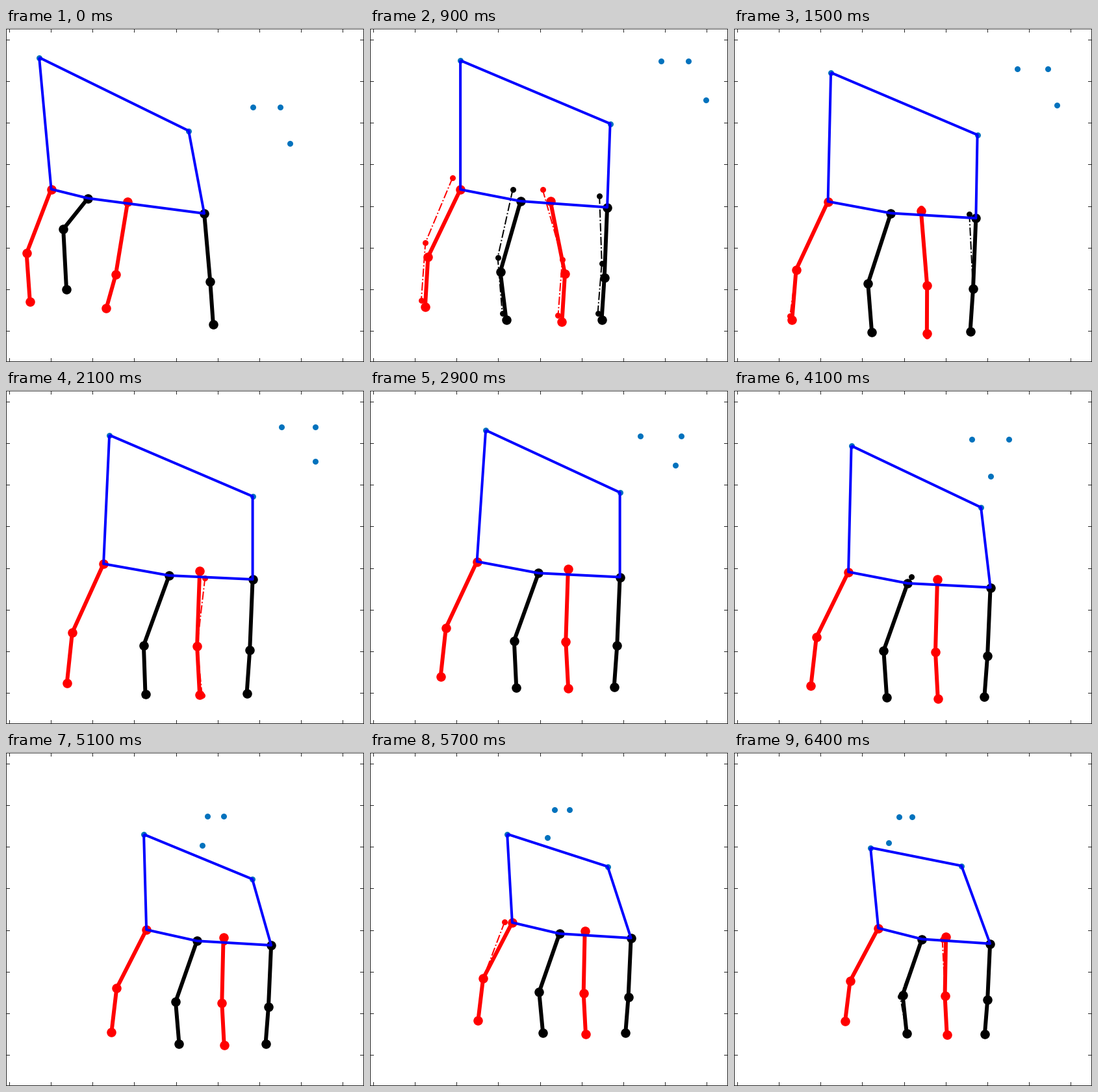
These frames come from a looping animation (551 px wide and 515 px high, 6.5 s). A matplotlib script:

```python
import numpy as np
import matplotlib.pyplot as plt
from matplotlib.animation import FuncAnimation

W, H, DPI = 551, 515, 100
FRAMES, INTERVAL = 65, 100
PX = 72 / DPI
RED, BLACK, BLUE, DOT, EDGE = "#ff0000", "#000000", "#0000ff", "#0072bd", "#262626"
NUDGE = np.array([-0.9, -0.5])

# Trunk: hind hip, distance to the fore hip, and the two back points above the hips
KEYS = [0, 9, 21, 29, 41, 51, 64]
HIP_X = [70.5, 140, 151, 165.5, 177, 217, 223]
HIP_Y = [249, 249.5, 268.5, 265, 281, 274.5, 272]
SPAN = [235.5, 226, 229.5, 220, 218.5, 192, 172]
RUMP_X = [-18.5, 0, 9, 13.5, 4.5, -4, -12]
RUMP_Y = [-203, -199, -198.5, -202.5, -194.5, -147, -124]
NECK_X = [-24, 4.5, 0, 0, -14.5, -29, -44]
NECK_Y = [-127.5, -129, -128, -130.5, -123.5, -102, -120]

# Head: one eye, then the gap to the other eye and to the mouth
EYE_X = [381, 449, 424.5, 417, 367, 311, 255]
EYE_Y = [122, 51, 57, 71.5, 76.5, 99, 100]
EYE_GAP = [42, 41.5, 52.5, 62.5, 57, 24.5, 20]
MOUTH_X = [56.5, 69, 52.5, 53.5, 28.5, -8, -16]
MOUTH_Y = [56, 60, 53, 45, 57, 45, 40]

# Gait: hip place along the span, drop, segment lengths, their factors
# during the first step, and the angles from vertical at the gait times
GAIT_T = [0, 9, 21, 64]
LEGS = [
    dict(color=RED, along=[0] * 4, drop=[0] * 4, size=(116, 78), step=(0.89, 0.93),
         thigh=[-21, -25.6, -24.4, -28], shin=[4, -3.3, -6, -7]),
    dict(color=BLACK, along=[0.24, 0.41, 0.44, 0.39], drop=[14, 18, 18, 17],
         size=(114, 75), step=(0.52, 1.21),
         thigh=[-38.6, -16, -20, -19], shin=[3, 7, 2, 6]),
    dict(color=RED, along=[0.5, 0.613, 0.645, 0.605], drop=[19, 18, 11, 13],
         size=(115, 75), step=(0.97, 0.7),
         thigh=[-9.3, 11.3, -2, -1], shin=[-15.6, -3.5, 3, 3]),
    dict(color=BLACK, along=[1] * 4, drop=[37.5, 27.5, 24, 24], size=(109, 66),
         step=(0.94, 0.98), thigh=[5, -2.3, -2.3, -2.6], shin=[4, -3.7, -4, -4.6]),
]

# Vertical swing of the view between neighbouring key times
SWING = [-15, 9, 6, 8, 0, -10]

# The thin estimate trails hip, knee and foot at first, later it slips at random
LAG = np.array([[-12, -18], [-4, -22], [-6, -10]])
rng = np.random.default_rng(4)
SLIPS = rng.normal(0, 4.5, (FRAMES, 4, 3, 2)) * (rng.random((FRAMES, 4, 3, 1)) < 0.15)


def track(t, *rows):
    return np.array([np.interp(t, KEYS, row) for row in rows])


def gait(t, row):
    return np.interp(t, GAIT_T, row)


def view_shift(t):
    i = min(np.searchsorted(KEYS, t, side="right") - 1, len(SWING) - 1)
    u = (t - KEYS[i]) / (KEYS[i + 1] - KEYS[i])
    return NUDGE + [0, SWING[i] * np.sin(np.pi * u)]


def bone(length, degrees):
    a = np.radians(degrees)
    return length * np.array([np.sin(a), np.cos(a)])


def leg_joints(leg, t, origin, span):
    scale = (span / 228) ** 0.8
    stepping = max(0, 1 - t / GAIT_T[1])
    hip = origin + [span * gait(t, leg["along"]), gait(t, leg["drop"])]
    joints = [hip]
    for part, size, factor in zip(("thigh", "shin"), leg["size"], leg["step"]):
        length = size * scale * (1 + (factor - 1) * stepping)
        joints.append(joints[-1] + bone(length, gait(t, leg[part])))
    return np.array(joints)


def estimate_shift(t):
    if t <= 14:
        return np.tile(LAG * np.interp(t, [0, 7, 9, 14], [0, 1.5, 1, 0]), (4, 1, 1))
    return SLIPS[t]


fig = plt.figure(figsize=(W / DPI, H / DPI), dpi=DPI, facecolor="white")
ax = fig.add_axes([0, 0, 1, 1])
ax.set_xlim(0, W)
ax.set_ylim(H, 0)
ax.axis("off")


def rule(x0, y0, x1, y1):
    ax.plot([x0, x1], [y0, y1], color=EDGE, lw=PX, snap=False,
            solid_capstyle="butt", zorder=1)


def draw_box():
    left, right, top, bottom, tick = 0.5, W - 0.5, 1.5, H - 0.5, 5.5
    for y in (top, bottom):
        rule(0, y, W, y)
    for x in (left, right):
        rule(x, 1, x, H)
    for i in range(9):
        x = round(5 + 64.15 * i) + 0.5
        rule(x, top, x, top + tick)
        rule(x, bottom, x, bottom - tick)
    for i in range(8):
        y = round(18 + 64.15 * i) + 0.5
        rule(left, y, left + tick, y)
        rule(right, y, right - tick, y)


def limb(color, width, size, style, z):
    return ax.plot([], [], style, color=color, lw=width * PX, marker="o",
                   ms=size * PX, mew=0, zorder=z, solid_joinstyle="round")[0]


draw_box()
dots = limb(DOT, 0, 9, "", 2)
thin = [limb(leg["color"], 2, 9, "-.", 3) for leg in LEGS]
thick = [limb(leg["color"], 6, 14.5, "-", 4) for leg in LEGS]
body = ax.plot([], [], color=BLUE, lw=4 * PX, zorder=5, solid_joinstyle="round",
               solid_capstyle="butt")[0]


def update(t):
    shift = view_shift(t)
    origin = track(t, HIP_X, HIP_Y) + shift
    span = track(t, SPAN)[0]
    legs = [leg_joints(leg, t, origin, span) for leg in LEGS]
    for joints, slip, line, est in zip(legs, estimate_shift(t), thick, thin):
        line.set_data(*joints.T)
        est.set_data(*(joints + slip).T)

    rump = origin + track(t, RUMP_X, RUMP_Y)
    neck = legs[3][0] + track(t, NECK_X, NECK_Y)
    eye = track(t, EYE_X, EYE_Y) + shift
    other_eye = eye + [track(t, EYE_GAP)[0], 0]
    mouth = eye + track(t, MOUTH_X, MOUTH_Y)
    dots.set_data(*np.array([rump, neck, eye, other_eye, mouth]).T)
    outline = [rump, neck, legs[3][0], legs[1][0], legs[0][0], rump]
    body.set_data(*np.array(outline).T)
    return [dots, *thin, *thick, body]


anim = FuncAnimation(fig, update, frames=FRAMES, interval=INTERVAL,
                     repeat=True, repeat_delay=0, blit=False)
plt.show()
```
